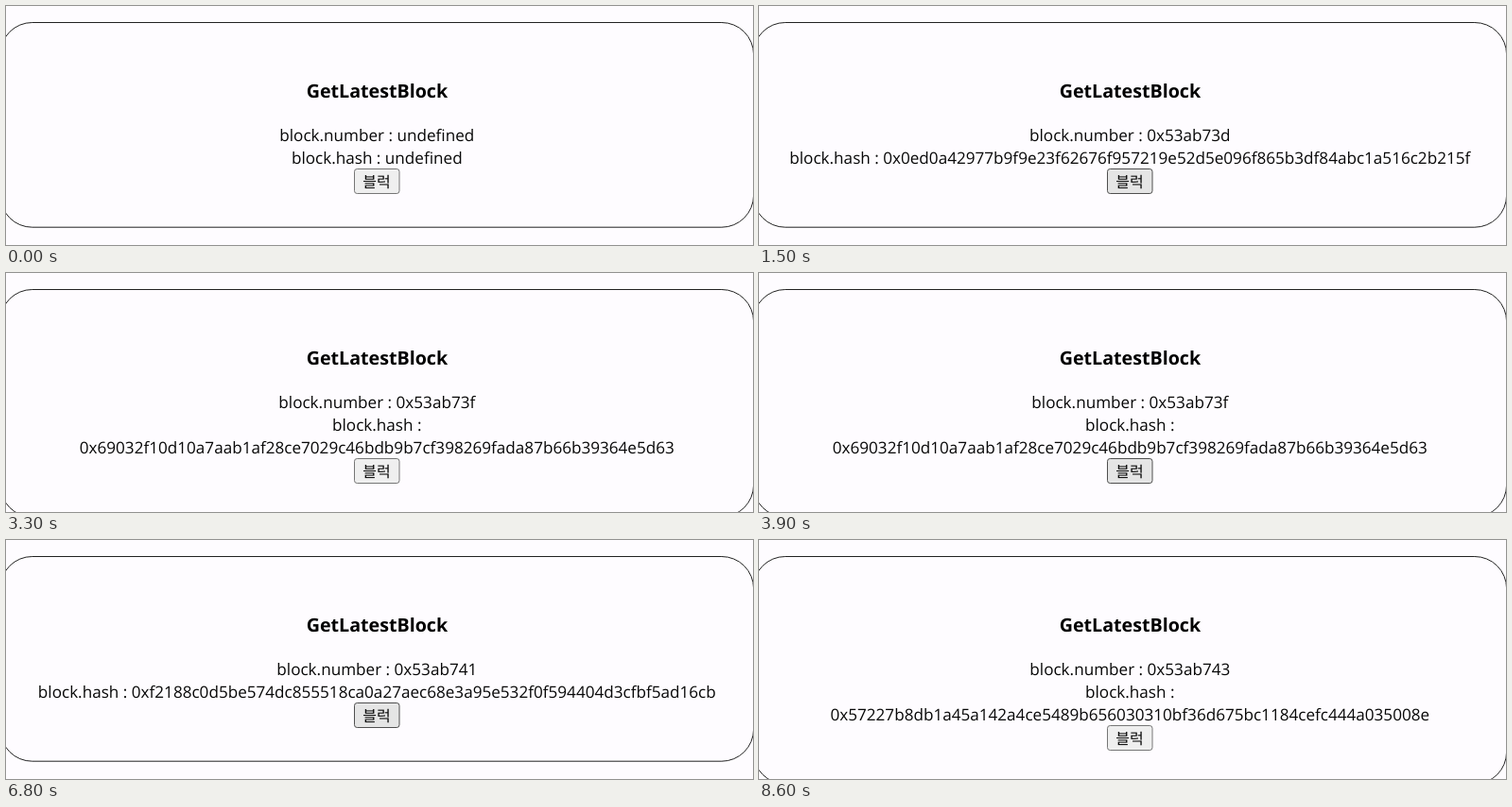
Animation, 790 px wide and 253 px high, one loop 8.7 s. Source, as an HTML page:

```html
<!DOCTYPE html>
<html lang="ko">
<head>
<meta charset="utf-8">
<title>GetLatestBlock</title>
<style>
  html, body { margin: 0; width: 100%; height: 100%; overflow: hidden; background: #fefcff; }
  svg { display: block; width: 790px; height: 253px; }
  text {
    font: 17.11px "Open Sans", "Noto Sans", sans-serif;
    text-anchor: middle;
    text-rendering: geometricPrecision;
    fill: #080808;
  }
  .title { font-size: 19.65px; font-weight: 700; fill: #000; }
  .label { font: 300 16px "Noto Sans CJK KR", "Noto Sans CJK", sans-serif; }
  #card { fill: none; stroke: #222; }
</style>
</head>
<body>
<svg viewBox="0 0 790 253">
  <rect id="card" x="-6" y="17.5" width="796.6" height="216.7" rx="33.75"/>
  <text class="title" x="392.4" y="97">GetLatestBlock</text>
  <text id="number" x="392.3" y="143"></text>
  <text id="hash" x="392.3" y="167"></text>
  <text id="wrapped" x="392.3" y="191.3"></text>
  <g id="button">
    <rect id="face" x="368.5" y="172.5" width="47.5" height="26" rx="2.8"/>
    <text class="label" x="392.1" y="191.7">블럭</text>
  </g>
</svg>
<script>
const LOOP = 8700;
const LINE = 24;

const blocks = [
  { at: 0, number: "undefined", hash: "undefined" },
  { at: 1100, number: "0x53ab73d", hash: "0x0ed0a42977b9f9e23f62676f957219e52d5e096f865b3df84abc1a516c2b215f" },
  { at: 2900, number: "0x53ab73f", wrap: true, hash: "0x69032f10d10a7aab1af28ce7029c46bdb9b7cf398269fada87b66b39364e5d63" },
  { at: 5200, number: "0x53ab741", hash: "0xf2188c0d5be574dc855518ca0a27aec68e3a95e532f0f594404d3cfbf5ad16cb" },
  { at: 7500, number: "0x53ab743", wrap: true, hash: "0x57227b8db1a45a142a4ce5489b656030310bf36d675bc1184cefc444a035008e" }
];

const pointer = [
  [0, "idle"], [400, "hover"], [900, "active"], [1000, "hover"],
  [2600, "active"], [2700, "hover"], [2900, "idle"], [3400, "hover"],
  [4800, "active"], [4900, "hover"], [5200, "idle"], [5700, "hover"],
  [7200, "active"], [7300, "hover"], [7500, "idle"]
];

const looks = {
  idle: ["#efefef", "#767676"],
  hover: ["#e5e5e5", "#4f4f4f"],
  active: ["#f5f5f5", "#8d8d8d"]
};

const $ = id => document.getElementById(id);
const setText = (id, value) => { $(id).textContent = value; };

let shownBlock, shownState;

function showBlock(block) {
  const shift = block.wrap ? LINE : 0;
  setText("number", "block.number : " + block.number);
  setText("hash", "block.hash :" + (block.wrap ? "" : " " + block.hash));
  setText("wrapped", block.wrap ? block.hash : "");
  $("button").setAttribute("transform", `translate(0 ${shift})`);
  $("card").setAttribute("height", 216.7 + shift);
}

function showState(state) {
  const [fill, stroke] = looks[state];
  $("face").setAttribute("fill", fill);
  $("face").setAttribute("stroke", stroke);
}

function draw() {
  const t = performance.now() % LOOP;
  const block = blocks.findLast(b => b.at <= t);
  const state = pointer.findLast(([at]) => at <= t)[1];
  if (block !== shownBlock) showBlock(shownBlock = block);
  if (state !== shownState) showState(shownState = state);
  requestAnimationFrame(draw);
}
draw();
</script>
</body>
</html>
```
